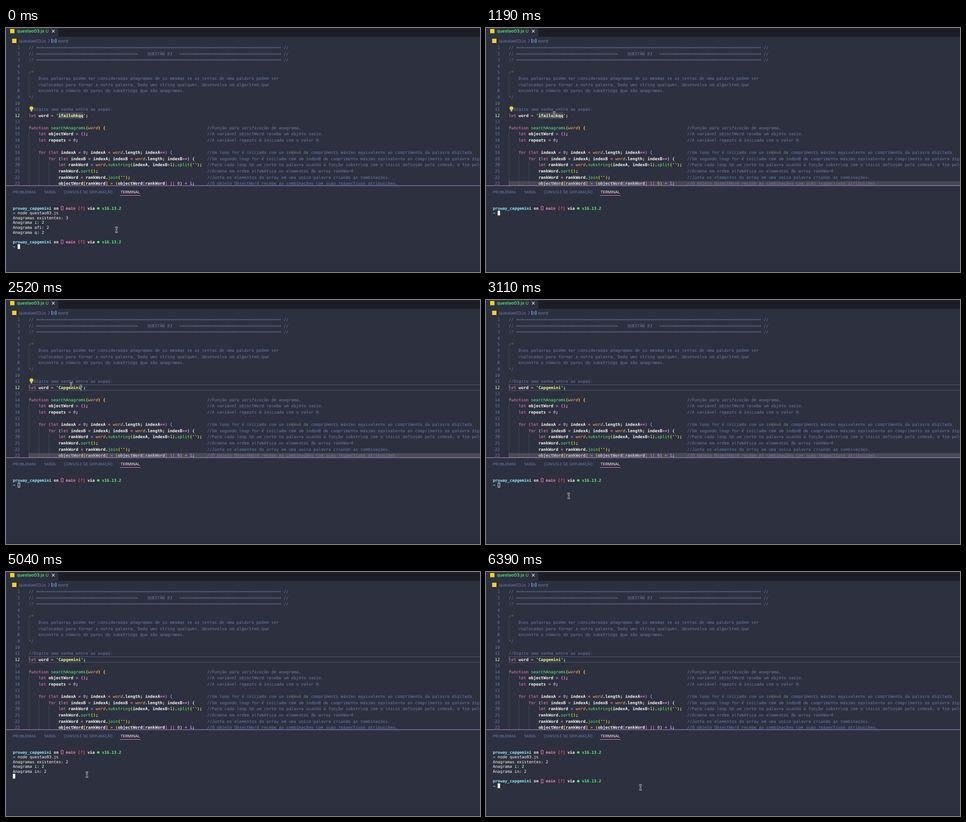
Write an HTML page with a canvas that moves like this. It is 1043 by 537 pixels and loops after 8000 ms.

```html
<!DOCTYPE html>
<html lang="pt">
<head>
<meta charset="utf-8">
<style>
html, body { margin: 0; width: 100%; height: 100%; overflow: hidden; background: #2d303e; }
canvas { display: block; }
</style>
</head>
<body>
<canvas id="stage" width="1043" height="537"></canvas>
<script>
const ctx = document.getElementById('stage').getContext('2d');
const LOOP = 8000;
const MONO = '"DejaVu Sans Mono", monospace';
const SANS = 'Inter, sans-serif';
const C = {
  bg: '#2d303e', bar: '#1c1d26', comment: '#6a7ab4', white: '#f8f8f2', pink: '#ff79c6',
  green: '#50fa7b', yellow: '#f1fa8c', purple: '#bd93f9', orange: '#ffb86c', cyan: '#8be9fd',
  red: '#ff5555', guide: '#44485a', gold: '#ffd700', orchid: '#da70d6', icon: '#f5cf2e'
};
const BRACKETS = [C.gold, C.orchid, C.cyan];
const CODE = { x: 50, y: 36.4, w: 5.45, h: 13.59, size: 9.05, base: 9.8 };
const TERM = { x: 15, y: 391.3, w: 5.3, h: 10.57, size: 8.8, base: 8.4 };

const rule = n => '='.repeat(n);
const note = (code, text) => code.padEnd(72) + '//' + text;
const lines = [
  `// ${rule(99)} //`,
  `// ${rule(41)}    QUESTÃO 03   ${rule(41)} //`,
  `// ${rule(99)} //`,
  '',
  '/*',
  '    Duas palavras podem ser consideradas anagramas de si mesmas se as letras de uma palavra podem ser',
  '    realocadas para formar a outra palavra. Dada uma string qualquer, desenvolva um algoritmo que',
  '    encontre o número de pares de substrings que são anagramas.',
  '*/',
  '',
  '//Digite uma senha entre as aspas.',
  '',
  '',
  note('function searchAnagrams(word) {', 'Função para verificação de anagrama.'),
  note('    let objectWord = {};', 'A variável objectWord recebe um objeto vazio.'),
  note('    let repeats = 0;', 'A variável repeats é iniciada com o valor 0.'),
  '',
  note('    for (let indexA = 0; indexA < word.length; indexA++) {', 'Um loop for é iniciado com um indexA de comprimento máximo equivalente ao comprimento da palavra digitada.'),
  note('        for (let indexB = indexA; indexB < word.length; indexB++) {', 'Um segundo loop for é iniciado com um indexB de comprimento máximo equivalente ao comprimento da palavra digitada.'),
  note("            let rankWord = word.substring(indexA, indexB+1).split('');", 'Para cada loop há um corte na palavra usando a função substring com o inicio definido pelo indexA, o fim pelo indexB.'),
  note('            rankWord.sort();', 'Ordena em ordem alfabética os elementos do array rankWord.'),
  note("            rankWord = rankWord.join('');", 'Junta os elementos do array em uma unica palavra criando as combinações.'),
  note('            objectWord[rankWord] = (objectWord[rankWord] || 0) + 1;', 'O objeto ObjectWord recebe as combinações com suas respectivas atribuições.')
];

// Time steps: [start, value...]
const MOUSE = [
  [0, 243, 444], [1040, 240, 354], [1190, 150, 190], [1330, 148, 193], [1480, 143, 188],
  [2670, 146, 199], [2810, 171, 296], [2960, 381, 412], [3110, 182, 431], [3250, 178, 446],
  [5940, 188, 454], [6090, 300, 529], [6240, 338, 478], [6390, 340, 474]
];
const SCROLLBAR = [[0, 0], [1190, .8], [1330, 1], [3110, .95], [3250, .6], [3400, .2], [3700, 0]];
const PROMPT = 'prompt', CMD = 'node questao03.js';
const RESULT = [PROMPT, '> ' + CMD, 'Anagramas existentes: 2', 'Anagrama i: 2', 'Anagrama in: 2'];
const SHELL = [
  [0, [PROMPT, '> ' + CMD, 'Anagramas existentes: 3', 'Anagrama i: 2', 'Anagrama afi: 2', 'Anagrama q: 2', '', PROMPT, '> ']],
  [600, [PROMPT, '> ']],
  [3990, [PROMPT, '> ' + CMD]],
  [5040, [...RESULT, '']],
  [5190, [...RESULT, '', PROMPT, '> ']]
];
const at = (steps, t) => steps.findLast(s => s[0] <= t);

function rect(x, y, w, h, color) {
  ctx.fillStyle = color;
  ctx.fillRect(x, y, w, h);
}

function frame(x, y, w, h, color) {
  ctx.strokeStyle = color;
  ctx.lineWidth = 1;
  ctx.strokeRect(x, y, w, h);
}

function path(color, width, d) {
  ctx.strokeStyle = color;
  ctx.lineWidth = width;
  ctx.stroke(new Path2D(d));
}

function text(str, x, y, color, font) {
  ctx.font = font;
  ctx.textRendering = 'geometricPrecision';
  ctx.fillStyle = color;
  ctx.fillText(str, x, y);
}

function cell(grid, str, col, row, color, style = '') {
  text(str, grid.x + col * grid.w, grid.y + row * grid.h + grid.base, color, `${style} ${grid.size}px ${MONO}`);
}

const TOKEN = /\/\/.*|'[^']*'|\w+|[()[\]{}]|[=<+|]+|[.;,]/g;

function drawCode(str, row, depth) {
  for (const m of str.matchAll(TOKEN)) {
    const s = m[0], next = str[m.index + s.length];
    let color = C.white, style = 'bold';
    if (s.startsWith('//')) [color, style] = [C.comment, ''];
    else if (s[0] === "'") color = C.yellow;
    else if (/^(let|for|function)$/.test(s)) [color, style] = [C.pink, ''];
    else if (/^\d/.test(s)) color = C.purple;
    else if (/^[=<+|]/.test(s)) color = C.pink;
    else if (/^[([{]/.test(s)) color = BRACKETS[depth++ % 3];
    else if (/^[)\]}]/.test(s)) color = BRACKETS[--depth % 3];
    else if (next === '(') [color, style] = [C.green, ''];
    else if (s === 'word' && row > 11) [color, style] = [C.orange, 'italic'];
    cell(CODE, s, m.index, row, color, style);
  }
  return depth;
}

function drawBulb(x, y) {
  ctx.fillStyle = '#ffcc33';
  ctx.beginPath();
  ctx.arc(x, y - 1.5, 4.2, 0, 7);
  ctx.fill();
  rect(x - 2, y + 1.5, 4, 2, '#ffcc33');
  rect(x - 1.7, y + 3.3, 3.4, 2.4, '#b9bcc6');
}

function drawEditor(t) {
  const pasted = t >= 2520, bulb = t < 2810, focused = t >= 1630 && t < 3400;
  if (pasted) frame(50.5, 186.5, 1000, 12.5, '#585c6e');
  else rect(115.4, 186, 54.5, 13.3, focused ? '#595d70' : '#484c60');

  const guides = [[0, 5, 8], [0, 14, 23], [4, 18, 23], [8, 19, 23]];
  for (const [col, from, to] of guides)
    rect(Math.round(CODE.x + col * CODE.w), CODE.y + from * CODE.h, 1, (to - from) * CODE.h, C.guide);

  let depth = 0;
  lines.forEach((line, row) => {
    const num = String(row + 1);
    cell(CODE, num, -3.6 - num.length, row, row === 11 ? C.white : C.comment);
    if (row === 11) drawCode(`let word = '${pasted ? 'Capgemini' : 'ifailuhkqq'}';`, row, 0);
    else if (row === 10 && bulb) cell(CODE, line.slice(2), 2, row, C.comment);
    else if (row < 11) cell(CODE, line, 0, row, C.comment);
    else depth = drawCode(line, row, depth);
  });
  if (bulb) drawBulb(56, 178);
  if (t >= 1630 && t < 2220) rect(169.5, 186, 1, 13.5, C.white);
  if (t >= 2520 && t < 3110) rect(164.5, 186, 1, 13.5, C.white);

  ctx.globalAlpha = at(SCROLLBAR, t)[1];
  rect(50, 337, 993, 10, 'rgba(121,121,121,.4)');
  ctx.globalAlpha = 1;
}

function drawHeader() {
  rect(115, 0, 928, 19.5, C.bar);
  rect(9, 2, 9.5, 9.5, C.icon);
  text('questao03.js', 24, 10, C.green, `500 9.7px ${SANS}`);
  text('U', 87, 10, C.green, `9.2px ${SANS}`);
  path('#e8e8e8', 1.1, 'M101 4l6 6M107 4l-6 6');
  rect(13.5, 23.5, 9.5, 9.5, C.icon);
  text('questao03.js', 29, 32, C.comment, `9.6px ${SANS}`);
  path(C.comment, 1, 'M92.5 24.5l3.5 4l-3.5 4');
  path('#75beff', 1, 'M103 24.5h-2.5v7.5h2.5M108 24.5h2.5v7.5h-2.5M103 28.2l2.5-2l2.5 1.2v2l-2.5 1.6l-2.5-1.2z');
  text('word', 114, 32, C.comment, `9.6px ${SANS}`);
}

function drawPanel(t) {
  rect(0, 347, 1043, 190, C.bg);
  rect(0, 346.5, 1043, 1, C.purple);
  const tabs = [['PROBLEMAS', 15], ['SAÍDA', 84], ['CONSOLE DE DEPURAÇÃO', 127], ['TERMINAL', 252]];
  for (const [name, x] of tabs)
    text(name, x, 364, x === 252 ? C.white : C.comment, `8.4px ${SANS}`);
  rect(251, 368, 45, 1, C.pink);
  rect(0, 536, 1043, 1, C.bar);

  const rows = at(SHELL, t)[1];
  rows.forEach((row, i) => {
    if (row === PROMPT) drawPrompt(i);
    else if (row[0] === '>') {
      cell(TERM, '→', 0, i, C.green, 'bold');
      cell(TERM, row.slice(2), 2, i, C.white);
    } else cell(TERM, row, 0, i, C.white);
  });
  const last = rows.length - 1;
  const x = TERM.x + rows[last].length * TERM.w, y = TERM.y + last * TERM.h;
  if (t >= 1630 && t < 3400) frame(26.5, 402.5, 4, 9.5, C.white);
  else rect(x, y, 5.3, 10.5, C.white);
}

function drawPrompt(row) {
  const parts = [
    ['proway_capgemini', 0, C.cyan], ['on', 17, C.white], ['main', 22, C.pink],
    ['[?]', 27, C.red], ['via', 31, C.white], ['v16.13.2', 37, C.green]
  ];
  for (const [s, col, color] of parts) cell(TERM, s, col, row, color, 'bold');
  const y = TERM.y + row * TERM.h;
  frame(121.5, Math.round(y) + 1.5, 4, 8, C.pink);
  ctx.fillStyle = C.green;
  ctx.beginPath();
  ctx.arc(203, y + 5.7, 2.6, 0, 7);
  ctx.fill();
}

function drawMouse(t) {
  const [, x, y] = at(MOUSE, t);
  ctx.save();
  ctx.translate(x, y);
  const beam = 'M-3 -5.5Q0 -5.5 0 -3.5Q0 -5.5 3 -5.5M0 -4V4M-3 5.5Q0 5.5 0 3.5Q0 5.5 3 5.5M-1.5 1.5H1.5';
  path('#f0f0f0', 2.6, beam);
  path('#15161c', 1, beam);
  ctx.restore();
}

function draw(now) {
  const t = now % LOOP;
  rect(0, 0, 1043, 537, C.bg);
  drawHeader();
  drawEditor(t);
  drawPanel(t);
  drawMouse(t);
  requestAnimationFrame(draw);
}
requestAnimationFrame(draw);
</script>
</body>
</html>
```
